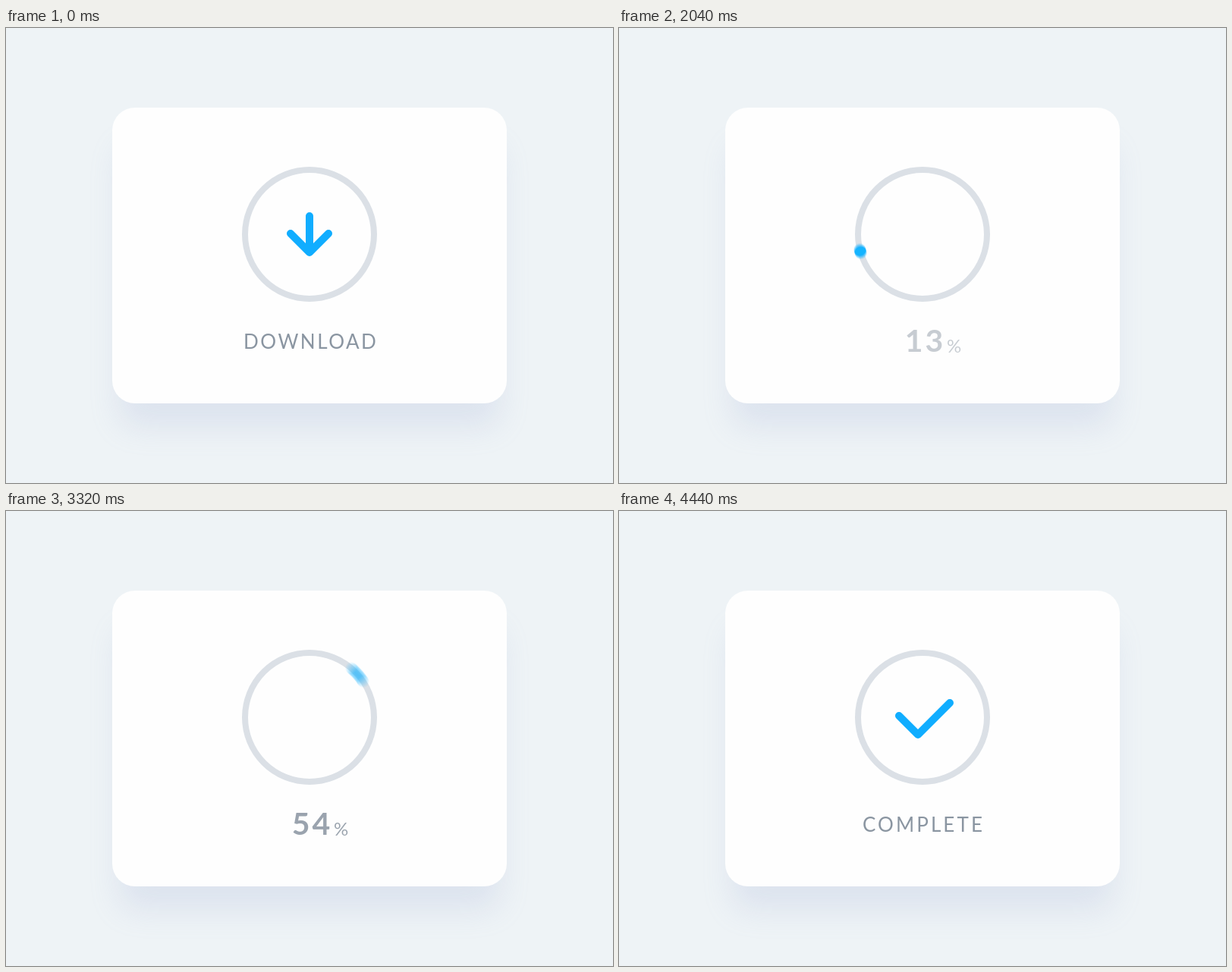
An HTML page with a canvas that plays this animation: 800 px wide and 600 px high, repeating every 6080 ms.

```html
<!DOCTYPE html>
<html lang="en">
<head>
<meta charset="utf-8">
<title>Download button</title>
<style>
  html, body { margin: 0; width: 100%; height: 100%; overflow: hidden; background: #eef3f6; }
  .card {
    position: absolute; left: 140px; top: 105px; width: 520px; height: 390px;
    border-radius: 30px; background: #fefefe;
    box-shadow: 0 40px 40px -10px rgba(150, 166, 212, .2);
  }
  svg, canvas { position: absolute; left: 0; top: 0; width: 800px; height: 600px; }
  text { font-family: Lato, Carlito, sans-serif; fill: #8a95a1; }
  .label { font-size: 26px; text-anchor: middle; }
  #start { letter-spacing: 2.5px; }
  #done { letter-spacing: 3.1px; }
  #num { font-size: 41px; font-weight: 700; letter-spacing: 3px; text-anchor: middle; }
  #pct { font-size: 24px; }
</style>
</head>
<body>
<div class="card"></div>
<svg viewBox="0 0 800 600">
  <circle cx="400" cy="272" r="85" fill="none" stroke="#dbe0e6" stroke-width="8"/>
  <text id="start" class="label" x="401.7" y="422.5">DOWNLOAD</text>
  <g id="count">
    <text id="num" x="403.5" y="427">0</text>
    <text id="pct" x="432" y="427.5">%</text>
  </g>
  <text id="done" class="label" x="401.5" y="422.5">COMPLETE</text>
</svg>
<canvas id="mark" width="800" height="600"></canvas>
<script>
const LOOP = 6080, STEP = 40, BLUE = '#10adff';
const CX = 400, CY = 272, R = 85;
const SHUTTER = 20, SAMPLES = 20;
const RISE = 240, SPIN = 480, LAND = 3990, OPEN = 4160;

// [time, value]
const ANGLE = [[SPIN, 0], [1000, 5.2], [1320, 18.5], [1480, 30.5], [1960, 90],
               [2560, 249], [3320, 671.6], [3800, 1155.6], [LAND, 1440]];
const COUNT = [[SPIN, 0], [1480, 6.4], [2560, 25.5], [3320, 54.5], [3800, 81.5], [LAND, 100]];
const FADE = [[400, 0], [520, .2], [680, .35], [1960, .35], [2000, .45], [2560, .67],
              [3320, .86], [3800, .96], [3900, 1], [4120, 0]];

const ARROW = [[[400, 248], [400, 296]], [[375, 271], [400, 296], [425, 271]]];
const CHECK = [[[369, 270], [394, 295], [436, 253]]];

const el = id => document.getElementById(id);
const ctx = el('mark').getContext('2d');
const part = (t, a, b) => Math.min(1, Math.max(0, (t - a) / (b - a)));
const inOut = p => p * p * (3 - 2 * p);
const out = p => 1 - (1 - p) ** 3;
const mix = (a, b, p) => a + (b - a) * p;

function segment(keys, t) {
  let i = 0;
  while (i < keys.length - 2 && t >= keys[i + 1][0]) i++;
  return i;
}

function linear(keys, t) {
  const i = segment(keys, t), [a, va] = keys[i], [b, vb] = keys[i + 1];
  return mix(va, vb, part(t, a, b));
}

function slope(keys, i) {
  const rate = j => (keys[j + 1][1] - keys[j][1]) / (keys[j + 1][0] - keys[j][0]);
  if (i === 0) return 0;
  if (i === keys.length - 1) return rate(i - 1);
  const h0 = keys[i][0] - keys[i - 1][0], h1 = keys[i + 1][0] - keys[i][0];
  return (rate(i - 1) * h1 + rate(i) * h0) / (h0 + h1);
}

// Cubic Hermite curve through the keys
function smooth(keys, t) {
  const i = segment(keys, t), [a, va] = keys[i], [b, vb] = keys[i + 1];
  const p = part(t, a, b), q = 1 - p, h = b - a;
  return mix(va, vb, inOut(p)) + h * p * q * (q * slope(keys, i) - p * slope(keys, i + 1));
}

function dotAt(t) {
  if (t < SPIN) return [CX, CY - R * inOut(part(t, RISE, SPIN))];
  if (t >= LAND) return [CX, CY - R * (1 - inOut(part(t, LAND, OPEN)))];
  const a = smooth(ANGLE, t) * Math.PI / 180;
  return [CX - R * Math.sin(a), CY - R * Math.cos(a)];
}

// Averages the dot over the shutter time
function drawDot(t) {
  ctx.globalCompositeOperation = 'lighter';
  ctx.globalAlpha = 1 / SAMPLES;
  for (let i = 0; i < SAMPLES; i++) {
    const [x, y] = dotAt(t + ((i + .5) / SAMPLES - .5) * SHUTTER);
    ctx.beginPath();
    ctx.arc(x, y, 8, 0, 7);
    ctx.fill();
  }
  ctx.globalAlpha = 1;
}

// Lines gathered into a dot at the centre: p = 0 is open, 1 is a dot
function drawLines(lines, p) {
  ctx.lineWidth = mix(10, 16, p);
  ctx.beginPath();
  for (const line of lines) {
    line.forEach(([x, y], i) => {
      const m = i ? 'lineTo' : 'moveTo';
      ctx[m](mix(x, CX, p), mix(y, CY, p) + (i ? .01 : 0));
    });
  }
  ctx.stroke();
}

function place(id, alpha, dy) {
  el(id).setAttribute('opacity', alpha);
  el(id).setAttribute('transform', `translate(0 ${dy})`);
}

function draw(t) {
  const leave = part(t, 40, 400), drop = part(t, 3900, 4120);
  place('start', 1 - leave, 15 * inOut(leave));
  place('count', linear(FADE, t), 15 * inOut(drop));
  place('done', part(t, 4100, 4440), 0);
  el('num').textContent = Math.floor(smooth(COUNT, t));

  ctx.clearRect(0, 0, 800, 600);
  ctx.fillStyle = ctx.strokeStyle = BLUE;
  ctx.lineCap = ctx.lineJoin = 'round';
  ctx.globalCompositeOperation = 'source-over';
  if (t < RISE) drawLines(ARROW, inOut(part(t, 40, RISE)));
  else if (t < OPEN) drawDot(t);
  else drawLines(CHECK, 1 - out(part(t, OPEN, 4440)));
}

const begin = performance.now();
function tick() {
  const t = (performance.now() - begin) % LOOP;
  draw(t < 80 ? 0 : Math.floor(t / STEP) * STEP);
  requestAnimationFrame(tick);
}
tick();
</script>
</body>
</html>
```
